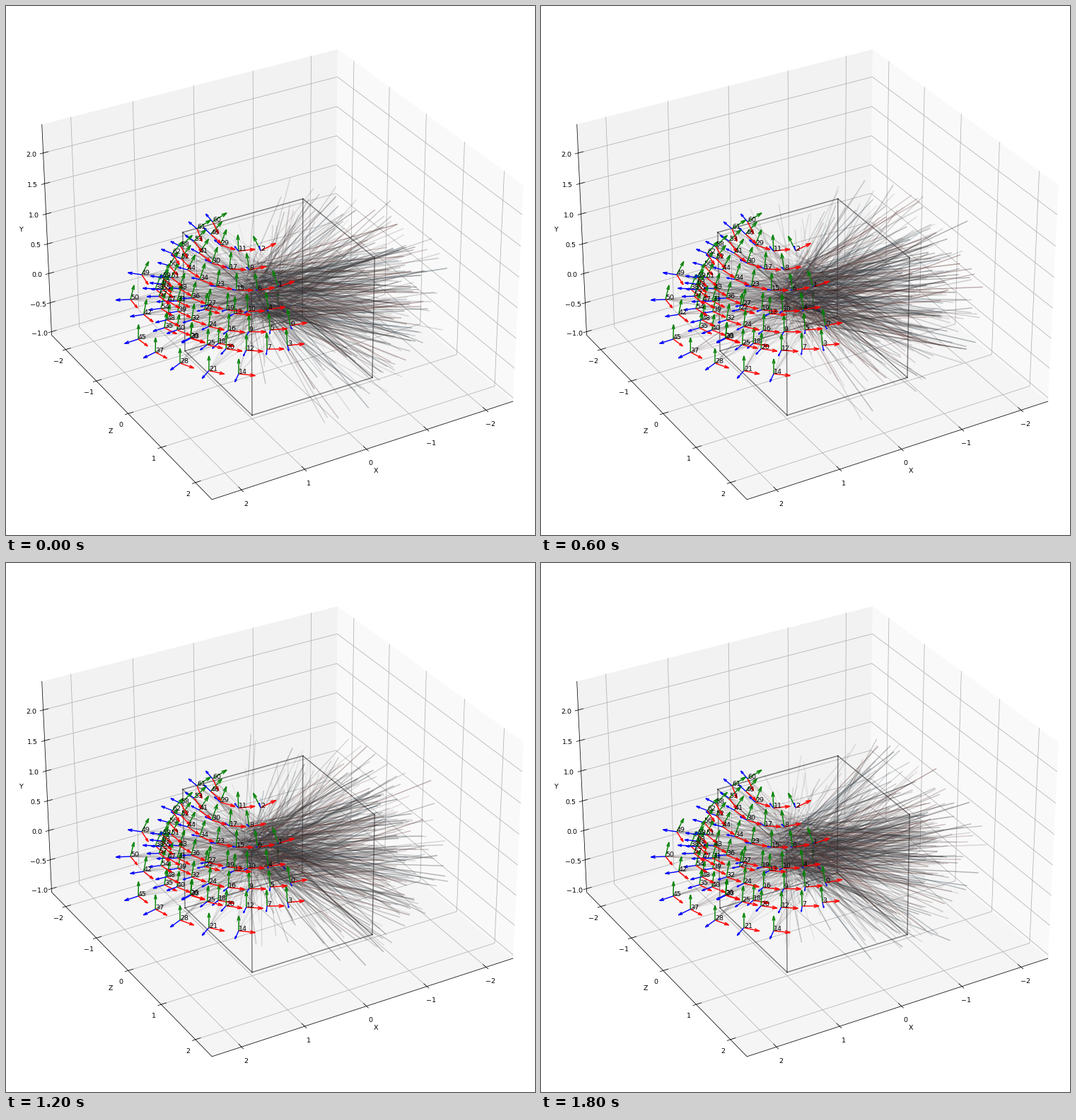
A matplotlib script for the animation above (2000 ms loop, 748 px wide and 748 px high).

```python
import numpy as np
import matplotlib.pyplot as plt
from matplotlib.animation import FuncAnimation
from matplotlib.collections import LineCollection

SIZE, DPI = 748, 68
FRAMES, INTERVAL = 10, 200

# Perspective view of a box centred above the origin, x axis mirrored.
XM, ZM, Y0, Y1 = 2.46, 2.47, -1.06, 2.46
ELEV = AZIM = np.radians(30)
DISTANCE, FOCAL = 40.9, 4047
MIDDLE = np.array([384.5, 363.7])
CENTRE = np.array([0, 0.7, 0])
TOWARD = np.array([np.cos(ELEV) * np.sin(AZIM), np.sin(ELEV),
                   np.cos(ELEV) * np.cos(AZIM)])
RIGHT = np.array([-np.cos(AZIM), 0, np.sin(AZIM)])
UP = np.array([-np.sin(ELEV) * np.sin(AZIM), np.cos(ELEV),
               -np.sin(ELEV) * np.cos(AZIM)])

RADIUS, ARROW, RAY = 2.45, 0.23, 4.9
AIM = np.array([0.05, 0.2, 0])
POLE = np.array([0.41, 0.87, 0.27])
RAYS_PER_CAMERA = 8

# Camera rows on the dome: start, middle and end on the stage, number of
# cameras, and the range of the key that numbers them across all rows.
FULL_ROWS = [
    ((360, 346), (303, 338), (292, 305), 5, 1.2, 57.5),
    ((344, 373), (281, 357), (270, 315), 6, 10, 59.75),
    ((385, 397), (285, 392), (247, 340), 8, 1, 57.4),
    ((371, 429), (262, 413), (235, 350), 9, 6.3, 62),
    ((402, 452), (274, 449), (221, 384), 10, 0, 57.45),
    ((398, 480), (261, 470), (220, 393), 11, 3.5, 62.5),
]
WIDE_ROWS = [
    ((329, 520), (246, 505), (187, 471), 5, 15.6, 42),
    ((300, 477), (224, 455), (176, 415), 5, 20.16, 48),
    ((323, 435), (242, 417), (192, 380), 5, 15.5, 45.82),
]


def project(points):
    p = np.asarray(points, float) - CENTRE
    scale = FOCAL / (DISTANCE - p @ TOWARD)
    return MIDDLE + np.stack([p @ RIGHT * scale, -(p @ UP) * scale], axis=-1)


def unit(v):
    return v / np.linalg.norm(v, axis=-1, keepdims=True)


def on_dome(px):
    """Near point of the camera sphere seen at a stage position."""
    eye = CENTRE + DISTANCE * TOWARD
    x, y = (px - MIDDLE) / FOCAL
    d = unit(x * RIGHT - y * UP - TOWARD)
    b = eye @ d
    return eye + d * (-b - np.sqrt(max(b * b - eye @ eye + RADIUS**2, 0)))


def arc(start, middle, end, count, half):
    """Evenly turned points on an elliptic arc through three points."""
    start, middle, end = map(np.array, (start, middle, end))
    a = (middle - (start + end) / 2) / (1 - np.cos(half))
    b = (end - start) / (2 * np.sin(half))
    t = np.linspace(-half, half, count)[:, None]
    return middle - a + a * np.cos(t) + b * np.sin(t)


def camera_places():
    places, keys = [], []
    for rows, half in ((FULL_ROWS, 1.05), (WIDE_ROWS, 0.7)):
        for start, middle, end, count, first, last in rows:
            places.extend(arc(start, middle, end, count, half))
            keys.extend(np.linspace(first, last, count))
    return np.array(places)[np.argsort(keys)]


def camera_axes(pos):
    """Right, up and back directions; the pole leans over for high cameras."""
    back = unit(pos - AIM)
    lean = np.clip((pos[1] / RADIUS - 0.2) / 0.5, 0, 1)
    pole = (1 - lean) * np.array([0, 1, 0]) + lean * POLE
    right = unit(np.cross(back, pole))
    return right, np.cross(right, back), back


fig = plt.figure(figsize=(SIZE / DPI, SIZE / DPI), dpi=DPI, facecolor="white")
ax = fig.add_axes([0, 0, 1, 1])
ax.set_xlim(0, SIZE)
ax.set_ylim(SIZE, 0)
ax.axis("off")


def path(points, color, width, z, **kw):
    ax.plot(*project(points).T, color=color, lw=width, zorder=z, **kw)


def pane(points, shade):
    ax.fill(*project(points).T, color=str(shade), lw=0, zorder=0)


def text(x, y, s, **kw):
    ax.text(x, y, s, fontsize=10, family="DejaVu Sans", **kw)


def centred(x, y, s):
    text(x, y, s, ha="center", va="center_baseline", zorder=3)


def tick(point, along, offset, label):
    """Short mark across an edge with its number beside it."""
    point, along = np.array(point), np.array(along)
    path([point - 0.08 * along, point + 0.05 * along], "black", 0.8, 2)
    centred(*(project(point) + offset), label.replace("-", "\u2212"))


def draw_box():
    pane([(XM, Y0, -ZM), (-XM, Y0, -ZM), (-XM, Y1, -ZM), (XM, Y1, -ZM)], 0.95)
    pane([(-XM, Y0, ZM), (-XM, Y0, -ZM), (-XM, Y1, -ZM), (-XM, Y1, ZM)], 0.975)
    pane([(XM, Y0, ZM), (XM, Y0, -ZM), (-XM, Y0, -ZM), (-XM, Y0, ZM)], 0.9625)

    grid = ("#b0b0b0", 0.8, 1)
    for v in range(-2, 3):
        path([(v, Y0, ZM), (v, Y0, -ZM), (v, Y1, -ZM)], *grid)
        path([(XM, Y0, v), (-XM, Y0, v), (-XM, Y1, v)], *grid)
        tick((v, Y0, ZM), (0, 0, 1), (6, 19), f"{v}")
        tick((XM, Y0, v), (1, 0, 0), (-10.5, 15.5), f"{v}")
    for v in np.arange(-1, 2.1, 0.5):
        path([(XM, v, -ZM), (-XM, v, -ZM), (-XM, v, ZM)], *grid)
        tick((XM, v, -ZM), (1, 0, 0), (-17, 1.5), f"{v:.1f}")

    path([(XM, Y1, -ZM), (XM, Y0, -ZM), (XM, Y0, ZM), (-XM, Y0, ZM)],
         "black", 0.8, 2)
    centred(523, 656, "X")
    centred(148, 600, "Z")
    centred(21, 315, "Y")


def draw_cube():
    ends = (-1, 1)
    for a in ends:
        for b in ends:
            for k in range(3):
                path([np.roll((e, a, b), k) for e in ends], "black", 1.5, 4,
                     alpha=0.5)


def arrow_parts(start, direction):
    a, b = project([start, start + ARROW * direction])
    parts = [(a, b)]
    for angle in np.radians((-16, 16)):
        c, s = np.cos(angle), np.sin(angle)
        parts.append((b, b - 0.32 * np.array([[c, -s], [s, c]]) @ (b - a)))
    return parts


def draw_axes(start, axes, z):
    for direction, color in zip(axes, ("red", "green", "blue")):
        ax.add_collection(LineCollection(arrow_parts(start, direction),
                                         colors=color, lw=1.5, zorder=z))


draw_box()
draw_cube()

hub = project((0, 0, 0))
draw_axes(np.zeros(3), np.eye(3), 4)
text(*hub, "w", zorder=4)

places = camera_places()
positions = np.array([on_dome(p) for p in places])
axes3d = np.array([camera_axes(p) for p in positions])
for i, place in enumerate(places):
    draw_axes(positions[i], axes3d[i], 6)
    text(*place, str(i), zorder=7)

# Cameras seen from the side throw stronger rays.
side = np.linalg.norm(places - hub, axis=1) / 210
TINTS = np.array([(0.16, 0.16, 0.16), (0.28, 0.28, 0.28),
                  (0.36, 0.20, 0.19), (0.19, 0.26, 0.31)])
rays = LineCollection([], lw=1.5, zorder=5, capstyle="butt")
ax.add_collection(rays)


def update(frame):
    """Throw a fresh set of rays, faint up to the hub and stronger beyond."""
    rng = np.random.default_rng(40 + frame)
    cam = np.repeat(np.arange(len(places)), RAYS_PER_CAMERA)
    n = len(cam)
    right, up, back = (axes3d[cam, k] for k in range(3))
    across = rng.uniform(-0.19, 0.19, (n, 1))
    along = rng.uniform(-0.15, 0.15, (n, 1))
    step = RAY * unit(across * right + along * up - back)
    a, b, c = (project(positions[cam] + t * step) for t in (0, 0.42, 1))
    alpha = (0.06 + 0.36 * side[cam]) * rng.uniform(0.4, 1.15, n)
    tint = TINTS[rng.choice(4, n, p=(0.33, 0.22, 0.27, 0.18))]
    rays.set_segments(np.concatenate([np.stack([a, b], 1),
                                      np.stack([b, c], 1)]))
    rays.set_color(np.concatenate([np.column_stack([tint, 0.4 * alpha]),
                                   np.column_stack([tint, alpha])]))
    return (rays,)


anim = FuncAnimation(fig, update, frames=FRAMES, interval=INTERVAL,
                     repeat=True, repeat_delay=0, blit=False)
plt.show()
```
